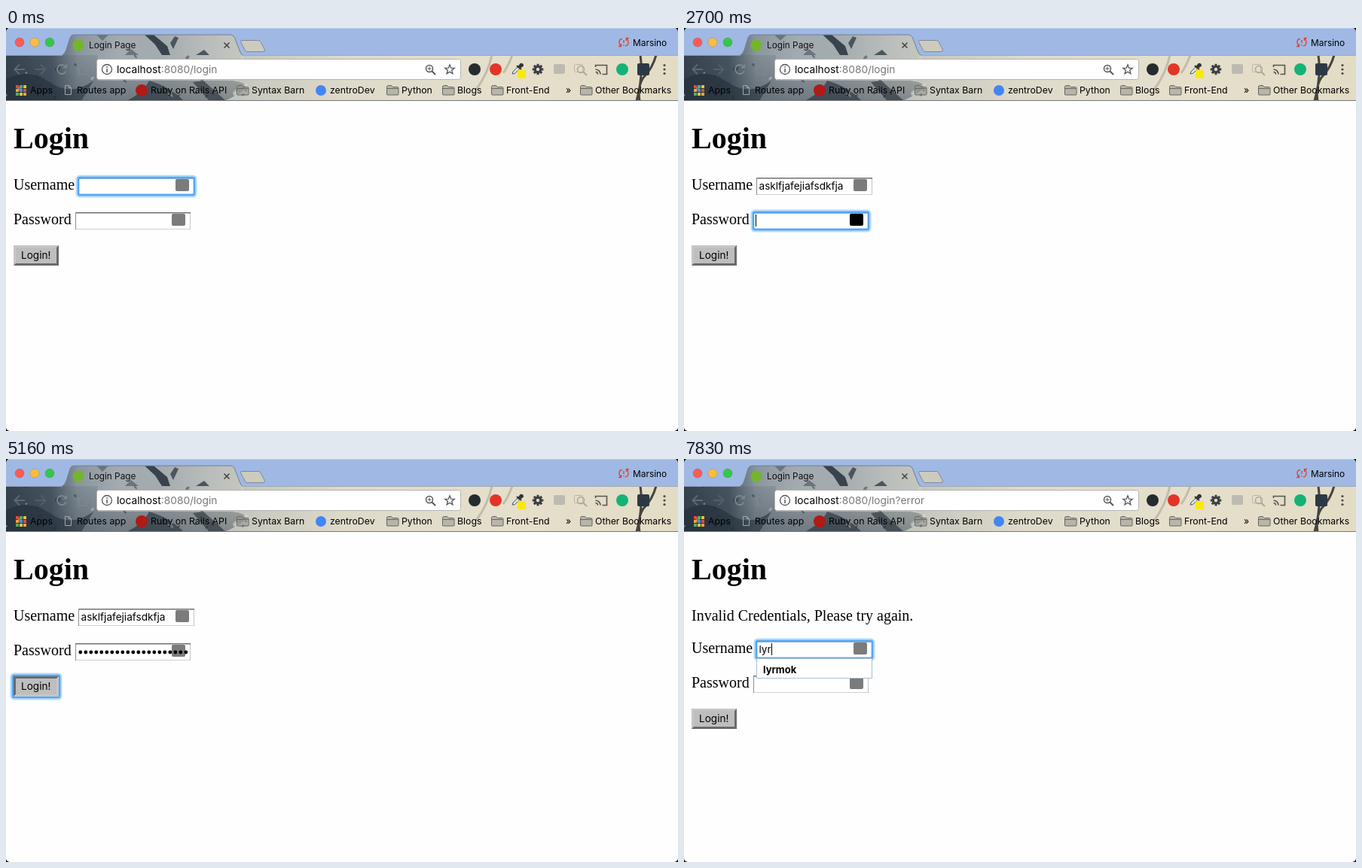
An HTML page with a canvas for the animation above (8000 ms loop, 892 by 536 pixels).

```html
<!DOCTYPE html>
<html lang="en">
<head>
<meta charset="utf-8">
<title>Login Page</title>
<style>
  html, body { margin: 0; width: 100%; height: 100%; overflow: hidden; background: #000; }
  canvas { display: block; }
</style>
</head>
<body>
<canvas id="stage" width="892" height="536"></canvas>
<script>
const ctx = document.getElementById('stage').getContext('2d');
const LOOP = 8000;
const UI = 'Inter, Roboto, sans-serif';
const SERIF = '"Liberation Serif", "Noto Serif", serif';
const USER_TEXT = 'asklfjafejiafsdkfja';
const SECOND_USER = 'lyrmok';
const SUBMIT = 5160, LOAD_START = 5300, LOADED = 5800, LOAD_END = 5900;

const between = (t, ...spans) => spans.some(([from, to]) => t >= from && t < to);

// Number of typed characters, from [time, count] points
function typed(t, points) {
  if (t < points[0][0]) return 0;
  for (let i = 1; i < points.length; i++) {
    const [t0, n0] = points[i - 1], [t1, n1] = points[i];
    if (t < t1) return Math.floor(n0 + (n1 - n0) * (t - t0) / (t1 - t0) + 1e-6);
  }
  return points[points.length - 1][1];
}

function text(str, x, y, size, color = '#000', family = UI, weight = 400) {
  ctx.font = `${weight} ${size}px ${family}`;
  ctx.fillStyle = color;
  ctx.fillText(str, x, y);
  return ctx.measureText(str).width;
}
function rect(x, y, w, h, color) {
  ctx.fillStyle = color;
  ctx.fillRect(x, y, w, h);
}
function box(x, y, w, h, r, fill, stroke, width = 1) {
  ctx.beginPath();
  ctx.roundRect(x, y, w, h, r);
  paint(fill, stroke, width);
}
function circle(x, y, r, fill, stroke, width = 1) {
  ctx.beginPath();
  ctx.arc(x, y, r, 0, 7);
  paint(fill, stroke, width);
}
function shape(d, fill, stroke, width = 1) {
  const path = new Path2D(d);
  paint(fill, stroke, width, path);
}
function paint(fill, stroke, width, path) {
  ctx.lineWidth = width;
  if (fill) { ctx.fillStyle = fill; path ? ctx.fill(path) : ctx.fill(); }
  if (stroke) { ctx.strokeStyle = stroke; path ? ctx.stroke(path) : ctx.stroke(); }
}
function gradient(stops) {
  const g = ctx.createLinearGradient(0, 0, 892, 0);
  stops.forEach(([at, color]) => g.addColorStop(at / 892, color));
  return g;
}

const TAB = 'M74 36.5 Q78 35 80 29 L85 13 Q86.500 9 90 9 H298 Q302 9 303.500 13 L310 30 Q312 36 315 36.500';

function themePhoto() {
  ctx.save();
  const area = new Path2D(TAB + 'Z');
  area.rect(0, 36, 892, 61);
  ctx.clip(area);
  rect(0, 0, 892, 97, gradient([[0, '#36434f'], [60, '#4b5965'], [95, '#8a959d'], [150, '#a3abb0'],
    [205, '#a4abae'], [270, '#b9bdbb'], [330, '#c9c9c0'], [450, '#dedaca'], [650, '#e5dfcc'], [892, '#e3dcc5']]));
  const shade = ctx.createLinearGradient(0, 36, 0, 97);
  shade.addColorStop(0, 'rgba(40,51,62,.15)');
  shade.addColorStop(1, 'rgba(40,51,62,.55)');
  ctx.globalAlpha = .75;
  shape('M0 36 H122 V70 H300 Q340 75 290 97 H0Z', shade);
  ctx.globalAlpha = 1;
  shape('M184 9 L196 9 L214 24 L218 36 L207 36 L198 22Z', '#38434d');
  shape('M218 20 L224 11 L229 13 L222 28Z M252 36 L263 29 L270 36Z', '#4b555d');
  shape('M120 9 L136 9 L128 17Z M158 36 L166 28 L176 36Z', '#6a757d');
  shape('M0 68 Q30 52 58 72 T116 70 L100 97 H0Z', 'rgba(31,42,53,.55)');
  shape('M190 70 Q218 78 236 97 H160 Q182 86 190 70Z M262 70 L292 97 H270 L248 72Z', 'rgba(34,44,54,.6)');
  // rain drops
  let seed = 7;
  const random = () => (seed = seed * 16807 % 2147483647) / 2147483647;
  for (let i = 0; i < 46; i++) {
    const x = random() * 345, y = 36 + random() * 58;
    ctx.beginPath();
    ctx.ellipse(x, y, 1 + random() * 3, 1 + random() * 2, 2.4, 0, 7);
    paint(i % 3 ? 'rgba(35,45,55,.45)' : 'rgba(215,222,224,.4)');
  }
  shape('M842 36 Q846 64 837 97 M863 36 Q858 54 846 66 Q838 78 841 97', null, '#46443e', 3);
  shape('M645 36 Q640 60 624 82 M672 36 Q667 50 660 60', null, 'rgba(90,86,72,.25)', 3);
  ctx.restore();
}

function folder(x) {
  shape(`M${x + .5} 78.500 q0 -2 2 -2 h4 l2 2 h6 q1.500 0 1.500 1.500 v8 q0 1 -1 1 h-13.500 q-1 0 -1 -1z M${x + .5} 80.500 h15`,
    'rgba(150,150,145,.55)', '#66665f');
}
function magnifier(x, y, color) {
  circle(x, y, 4.5, null, color, 1.5);
  shape(`M${x + 3.5} ${y + 3.5} l4.500 4.500`, null, color, 2);
}

function titleBar(t) {
  rect(0, 0, 892, 36, '#9fb9e4');
  rect(0, 0, 892, 1, '#b6caec');
  themePhoto();
  shape(TAB, null, '#747f90');
  rect(0, 36, 75, 1, '#8795ad');
  rect(314, 36, 578, 1, '#a2a9b0');
  ['#fc5b57', '#fdbc40', '#34c84a'].forEach((c, i) => circle(18 + i * 20, 19, 6, c, 'rgba(0,0,0,.12)'));
  if (between(t, [LOAD_START, LOAD_END])) {
    const blue = t >= LOADED, angle = (t - LOAD_START) / 160 * (blue ? 1 : -1);
    ctx.beginPath();
    ctx.arc(96, 23, 6.5, angle, angle + (blue ? 4.5 : 3));
    paint(null, blue ? '#3b78e7' : '#555', 2);
  } else {
    circle(96, 23, 7.5, '#73b62b');
  }
  text('Login Page', 110, 27, 11.8, '#111');
  shape('M289.500 19.500 l7 7 m0 -7 l-7 7', null, '#444', 1.5);
  shape('M313 16.500 H335 Q337 16.500 338 18.500 L343.500 29 Q344 31.500 341 31.500 H320 Q318 31.500 317 29 L311.500 18.500 Q311 16.500 313 16.500Z',
    '#cdcbbd', '#7f8896');
  shape('M818 14.500 q-4 0 -4 4.500 q0 3 2 5 m-3 .5 h3.500 v-3.500 M822 24 q4 -.5 4 -5 q0 -3 -2 -5 m3 -.5 h-3.500 v3.500 M820 16 v4 M820 22 v1.500',
    null, '#d5483c', 1.4);
  text('Marsino', 832, 24, 11.9);
}

function toolbar(t) {
  const dim = '#5f6973', nav = '#7f878c';
  shape('M25 55 H12 m6 -6.500 l-6.500 6.500 l6.500 6.500', null, dim, 1.8);
  shape('M39 55 H52 m-6 -6.500 l6.500 6.500 l-6.500 6.500', null, '#535f69', 1.8);
  if (between(t, [LOAD_START, LOAD_END])) {
    shape('M68.500 49.500 l11 11 m0 -11 l-11 11', null, nav, 2);
  } else {
    ctx.beginPath();
    ctx.arc(74, 55, 6, .4, 5.4);
    paint(null, nav, 1.8);
    shape('M81 47.500 v6 h-6z', nav);
  }
  shape('M94 55.500 l8 -7.500 l8 7.500 M97 54 v8 h10 v-8', null, nav, 1.7);

  box(120.5, 41.5, 483, 27, 3, '#fff', '#b4b4ae');
  circle(134, 55, 6.5, null, '#555', 1.3);
  rect(133.3, 54, 1.5, 5, '#555');
  rect(133.3, 51, 1.5, 1.7, '#555');
  const w = text('localhost', 147, 60, 13.75);
  text(':8080/login' + (t >= LOADED ? '?error' : ''), 147 + w, 60, 13.75, '#777');
  magnifier(562, 54, '#555');
  shape('M559.500 54 h5 m-2.500 -2.500 v5', null, '#555');
  let star = '';
  for (let i = 0; i < 10; i++) {
    const r = i % 2 ? 2.8 : 6.6, a = i * Math.PI / 5;
    star += `${i ? 'L' : 'M'}${589 + r * Math.sin(a)} ${55.4 - r * Math.cos(a)}`;
  }
  shape(star + 'Z', null, '#555', 1.3);

  circle(622, 55, 8, '#262b2e');
  circle(650, 55, 8, '#e23527');
  shape('M672 61 l1 -3 l6 -6 l2.500 2.500 l-6 6z', '#d8e0e2', '#555');
  shape('M678 50 l2 2 l3 -4 q3 -1 3 2 l-4 3 l2 2', '#333', '#333', 2);
  rect(679, 56, 11, 11, '#f8e90c');
  for (let i = 0; i < 8; i++) {
    const a = i * Math.PI / 4;
    shape(`M706 55 l${7.3 * Math.cos(a)} ${7.3 * Math.sin(a)}`, null, '#3c3f43', 3);
  }
  circle(706, 55, 5.4, '#3c3f43');
  circle(706, 55, 2.2, '#e0dac7');
  box(727, 48, 15, 13, 2, '#bdbbb1');
  box(754.5, 48.5, 11, 10, 1, null, '#b9b5a7');
  magnifier(763, 55, '#aaa79b');
  shape('M782.500 52 v-2.500 h15 v12 h-6 M782.500 55 q6 .5 6.500 6.500 M782.500 58.500 q3 0 3 3', null, '#55544e', 1.6);
  circle(818, 55, 8, '#15b277');
  box(838, 47, 16, 16, 2, '#2c3944');
  [49.5, 55, 60.5].forEach(y => circle(874, y, 1.6, '#4c4b46'));
}

function bookmarks() {
  const grid = ['#e34b3e', '#e9a43a', '#5bac57', '#4a8de0', '#e6c23d'];
  for (let i = 0; i < 9; i++) rect(13 + i % 3 * 5, 76 + Math.floor(i / 3) * 5, 4, 4, grid[i * 2 % 5]);
  shape('M78.500 76.500 h5 l3 3 v9 h-8z m5 0 v3 h3', null, '#a0a7ab');
  circle(180, 83, 8, '#b01a17');
  circle(418, 83, 7, '#4285f4');
  [306, 505, 579, 644, 762].forEach(folder);
  [['Apps', 32], ['Routes app', 94], ['Ruby on Rails API', 192], ['Syntax Barn', 326], ['zentroDev', 430],
    ['Python', 525], ['Blogs', 599], ['Front-End', 664], ['»', 743], ['Other Bookmarks', 782]]
    .forEach(([label, x]) => text(label, x, 87, 12.3));
  rect(0, 96, 892, 1, '#77787a');
}

function focusRing(x, y, w, h) {
  box(x - 1, y - 1, w + 2, h + 2, 3, null, 'rgba(90,175,255,.45)', 5);
  box(x, y, w, h, 2, null, '#55a5f2', 2.5);
}
function field(x, y, w, focused, icon) {
  rect(x, y, w, 23, '#fff');
  rect(x, y + 22, w, 1, '#d0d0d0');
  rect(x + w - 1, y, 1, 23, '#c4c4c4');
  rect(x, y, w, 1.5, '#707070');
  rect(x, y, 1, 23, '#8d8d8d');
  if (focused) focusRing(x, y, w, 23);
  if (icon) box(x + w - 25, y + 2, 18, 16, 2, icon);
}
function caret(x, y) { rect(x, y, 1, 16, '#000'); }

function button(y, pressed, focused) {
  if (focused) focusRing(9, y - 1, 62, 29);
  rect(10, y, 60, 27, '#bebebe');
  const [light, dark] = ['#c6c6c6', '#6a6a6a'];
  shape(`M10 ${y + 27} V${y} H70 l-3 3 H13 V${y + 24}z`, pressed ? dark : light);
  shape(`M10 ${y + 27} H70 V${y} l-3 3 V${y + 24} H13z`, pressed ? light : dark);
  text('Login!', 20, y + 18, 13.6);
}

function dropdown(y, rows) {
  box(96.5, y + .5, 153, 24 * rows + 2, 0, '#fff', '#a9bfd8');
}

function passwordDots(count, y, focused, caretOn) {
  const end = 95.5 + 7 * count;
  const scroll = focused ? Math.max(0, end - 239.5) : 0;
  ctx.save();
  ctx.beginPath();
  ctx.rect(95, y, 146.5, 23);
  ctx.clip();
  for (let i = 0; i < count; i++) circle(98.8 + 7 * i - scroll, y + 12, 2.4, '#000');
  if (caretOn) caret(Math.round(end - scroll - .5), y + 3);
  ctx.restore();
}

function page(t) {
  const retry = t >= LOADED, shift = retry ? 43 : 0;
  const userY = 199 + shift, passY = 245 + shift;
  const userFocus = t < 2700 || t >= 6900;
  const passFocus = between(t, [2700, SUBMIT]);
  const caretOn = between(t, [30, 530], [1030, 1530], [1700, 4360], [4860, SUBMIT], [6900, 7400], [7560, LOOP]);
  const iconsReady = !between(t, [LOADED, 6000]);
  const icon = dark => iconsReady && (dark ? '#000' : '#7b7b7b');
  const userDark = between(t, [4660, 4730], [6660, 6900]);
  const passDark = between(t, [2700, 4800], [6460, 6500]);

  rect(0, 97, 892, 439, '#fdfefd');
  text('Login', 10, 160, 40, '#000', SERIF, 700);
  if (retry) text('Invalid Credentials, Please try again.', 10, 215, 20, '#000', SERIF);
  text('Username', 10, userY + 16, 20, '#000', SERIF);
  text('Password', 10, passY + 16, 20, '#000', SERIF);

  field(96, userY, 154, userFocus, icon(userDark));
  const name = retry
    ? SECOND_USER.slice(0, between(t, [7560, 7760]) ? 1 : between(t, [7760, 7830]) ? 2 : t >= 7830 ? 3 : 0)
    : USER_TEXT.slice(0, typed(t, [[1700, 2], [1760, 4], [2500, 19]]));
  const width = text(name, 99.5, userY + 16, 13.6);
  if (userFocus && caretOn) caret(Math.round(100 + width), userY + 3);

  field(92, passY, 153, passFocus, icon(passDark));
  const count = retry ? 0 : typed(t, [[3000, 1], [3760, 20], [3800, 21], [3830, 22], [3860, 23]]);
  passwordDots(count, passY, passFocus, passFocus && caretOn);

  button(289 + shift, between(t, [SUBMIT, 5230]), between(t, [SUBMIT, LOADED]));

  if (between(t, [1700, 1730])) dropdown(222, 6);
  if (t >= 7560) {
    dropdown(265, 1);
    text(SECOND_USER, 105, 285, 13, '#000', UI, 700);
  }
}

function draw(now) {
  const t = now % LOOP;
  rect(0, 0, 892, 536, '#000');
  ctx.save();
  ctx.beginPath();
  ctx.roundRect(0, 0, 892, 536, 5);
  ctx.clip();
  titleBar(t);
  toolbar(t);
  bookmarks();
  page(t);
  ctx.restore();
  requestAnimationFrame(() => draw(performance.now() - start));
}
const start = performance.now();
draw(0);
</script>
</body>
</html>
```
